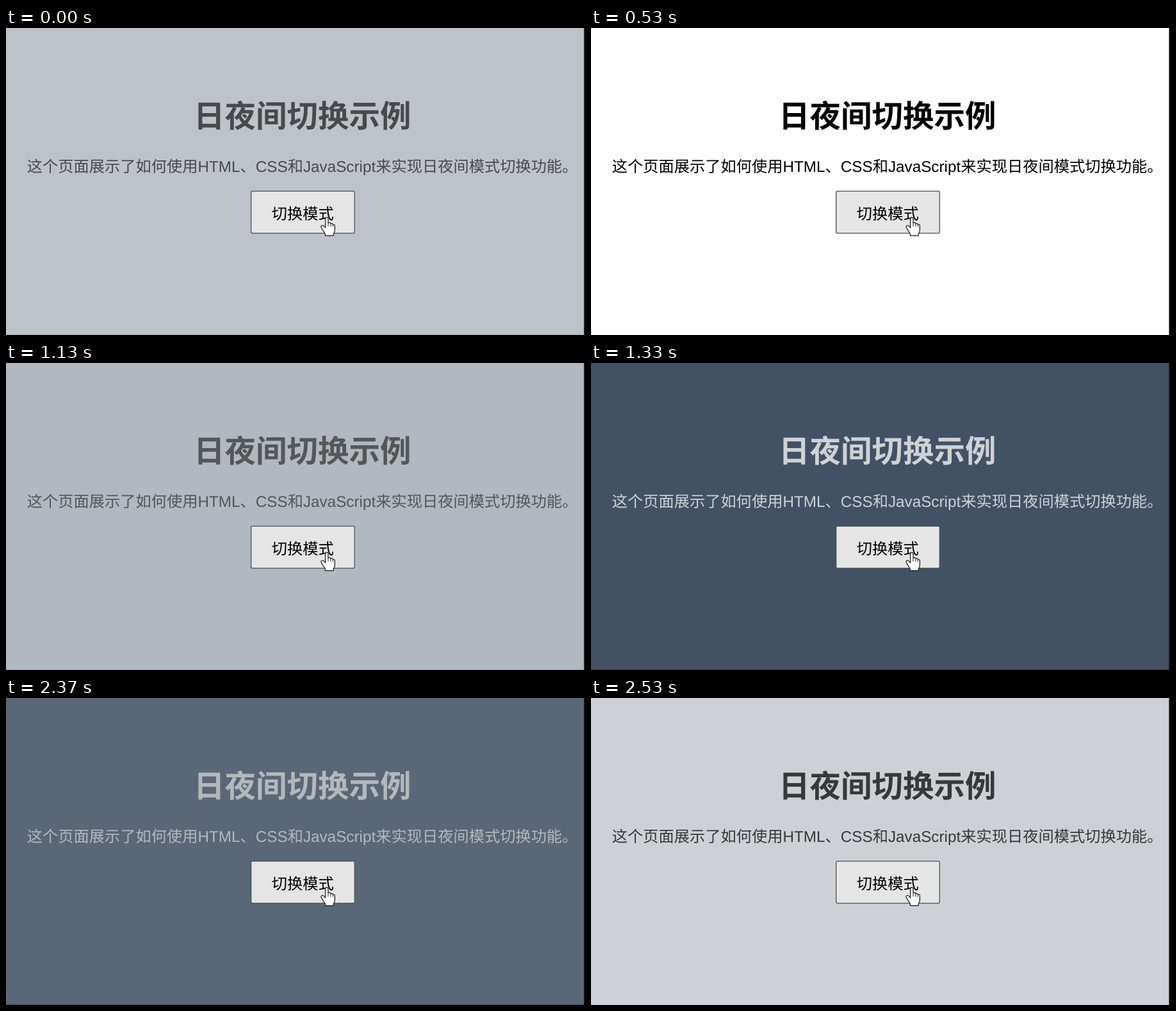
An HTML page that plays this animation: 904x480 px, repeating every 2560 ms.

```html
<!DOCTYPE html>
<html lang="zh-CN">
<head>
<meta charset="utf-8">
<style>
  html, body { margin: 0; width: 100%; height: 100%; overflow: hidden; }
  svg { display: block; width: 904px; height: 480px; }
  text {
    font: 24.25px "Liberation Sans", Arial, "Noto Sans CJK SC", "Noto Sans CJK", sans-serif;
    text-rendering: geometricPrecision;
  }
  .title { font-size: 48.5px; font-weight: 700; }
</style>
</head>
<body>
<svg viewBox="0 0 904 480" xmlns="http://www.w3.org/2000/svg">
  <rect id="page" width="904" height="480"/>
  <rect id="foot" y="479" width="904" height="1"/>
  <rect x="902.5" width="1.5" height="480"/>
  <g id="copy">
    <text class="title" x="293" y="155">日夜间切换示例</text>
    <text x="32.8" y="225">这个页面展示了如何使用HTML、CSS和JavaScript来实现日夜间模式切换功能。</text>
  </g>
  <rect x="382.7" y="255.2" width="161.6" height="65.6" rx="2" fill="#e5e5e5" stroke="#4f4f4f" stroke-width="1.3"/>
  <text x="414.7" y="299">切换模式</text>
  <g stroke="#222" stroke-width="1.3" stroke-linejoin="round" stroke-linecap="round">
    <path fill="#fff" d="M498.6 298.6q0-2.4 2.2-2.4q2.2 0 2.2 2.4V304.6q3.6-1 4 1.2q3-.6 3.4 1.4q3-.4 3 2.4V316q0 3-2.2 6V324.6H498.4V322q-1.2-2.6-3.4-5.4L492.3 312q-1-2.4 1-3.2q2-.6 3.6 1.6l1.7 2Z"/>
    <path fill="none" stroke-width="1" d="M503 304.6V310M507 305.8V310.4M510.4 307.2V310.6"/>
  </g>
</svg>
<script>
const LOOP = 2560, FADE = 540;
const NIGHT_AT = 1006, DAY_AT = 2279, LEAD = 220;
const DAY = { page: [255, 255, 255], copy: [0, 0, 0] };
const NIGHT = { page: [42, 59, 80], copy: [234, 237, 240] };
const $ = id => document.getElementById(id);
const page = $("page"), copy = $("copy"), foot = $("foot");

const bezier = (a, b, u) => 3 * a * u * (1 - u) ** 2 + 3 * b * u * u * (1 - u) + u ** 3;

// CSS "ease": cubic-bezier(.25, .1, .25, 1)
function ease(x) {
  if (x <= 0) return 0;
  if (x >= 1) return 1;
  let lo = 0, hi = 1;
  for (let i = 0; i < 24; i++) {
    const mid = (lo + hi) / 2;
    if (bezier(0.25, 0.25, mid) < x) lo = mid; else hi = mid;
  }
  return bezier(0.1, 1, lo);
}

// The loop opens partway through a fade to day.
function nightLevel(t) {
  if (t < NIGHT_AT) return 1 - ease((t + LEAD) / FADE);
  if (t < DAY_AT) return ease((t - NIGHT_AT) / FADE);
  return 1 - ease((t - DAY_AT) / FADE);
}

const mix = (key, k) =>
  `rgb(${DAY[key].map((c, i) => Math.round(c + (NIGHT[key][i] - c) * k))})`;

function draw(now) {
  const k = nightLevel(now % LOOP);
  page.setAttribute("fill", mix("page", k));
  copy.setAttribute("fill", mix("copy", k));
  foot.setAttribute("opacity", 0.35 * k);
}

let start;
function tick(now) {
  start ??= now;
  draw(now - start);
  requestAnimationFrame(tick);
}
draw(0);
requestAnimationFrame(tick);
</script>
</body>
</html>
```
